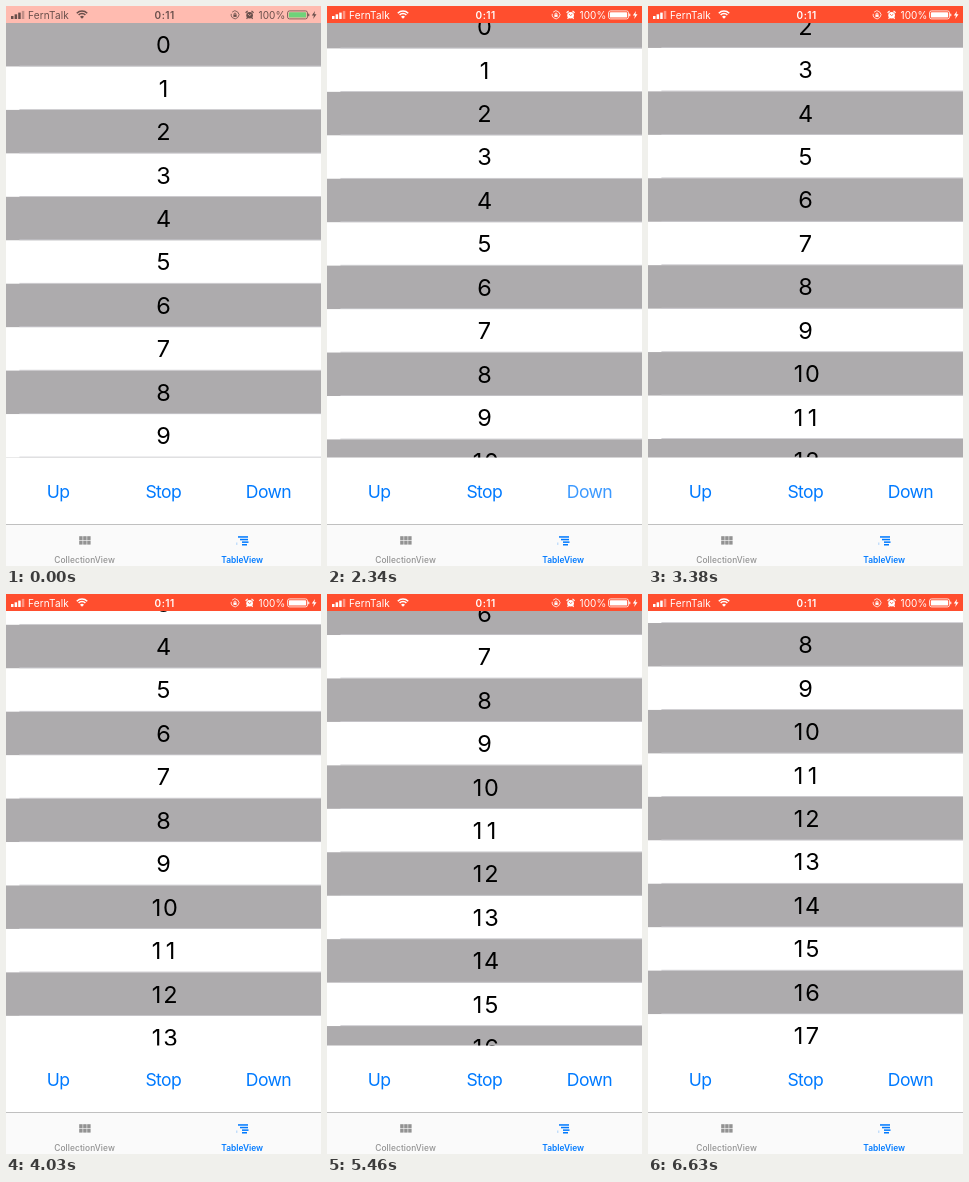
An HTML page with a canvas for the animation above (7.02 s loop, 315 by 560 pixels).

```html
<!DOCTYPE html>
<html lang="en">
<head>
<meta charset="utf-8">
<title>Auto-scrolling table</title>
<style>
  html, body { margin: 0; width: 100%; height: 100%; overflow: hidden; background: #fff; }
  canvas { display: block; width: 315px; height: 560px; }
</style>
</head>
<body>
<canvas id="stage"></canvas>
<script>
const W = 315, H = 560, LOOP = 7020, STEP = 130, LAST = 6630;
const LIST_TOP = 17, LIST_END = 451, ROW = 43.45;
const SPEED = 0.084, SCROLL_FROM = 2125, SCROLL_TO = 6120;
const BLUE = '#007aff', GRAY = '#929292';

const canvas = document.getElementById('stage');
const ctx = canvas.getContext('2d');
const dpr = window.devicePixelRatio || 1;
canvas.width = W * dpr;
canvas.height = H * dpr;

const clamp = (v, lo, hi) => Math.min(hi, Math.max(lo, v));
const mix = (a, b, k) => `rgb(${a.map((v, i) => Math.round(v + (b[i] - v) * k))})`;

function rect(x, y, w, h, color) {
  ctx.fillStyle = color;
  ctx.fillRect(x, y, w, h);
}

function text(str, x, y, size, color, { weight = 400, align = 'center', spacing = 0 } = {}) {
  ctx.font = `${weight} ${size}px Inter, "Liberation Sans", sans-serif`;
  ctx.letterSpacing = spacing + 'px';
  ctx.textAlign = align;
  ctx.fillStyle = color;
  ctx.fillText(str, x, y);
}

function arc(x, y, r, from = 0, to = Math.PI * 2) {
  ctx.beginPath();
  ctx.arc(x, y, r, from, to);
}

function poly(...pts) {
  ctx.beginPath();
  pts.forEach(([x, y]) => ctx.lineTo(x, y));
}

function box(x, y, w, h, r) {
  ctx.beginPath();
  ctx.roundRect(x, y, w, h, r);
}

function drawList(offset) {
  ctx.save();
  ctx.beginPath();
  ctx.rect(0, LIST_TOP, W, LIST_END + 0.5 - LIST_TOP);
  ctx.clip();
  const first = Math.floor(offset / ROW);
  for (let i = first; i < first + 11; i++) {
    const y = LIST_TOP + i * ROW - offset;
    if (i % 2 === 0) rect(0, y, W, ROW, '#adabad');
    rect(13.4, y + ROW - 0.8, W, 0.8, '#c8c7cc');
    const digits = [...String(i)];
    digits.forEach((d, n) => {
      const x = 157.5 + (n - (digits.length - 1) / 2) * 14;
      text(d, x, y + 30.2, 23.5, '#000');
    });
  }
  ctx.restore();
}

// Dims while held, then fades back after release.
function pressAlpha(t, down, up) {
  if (t < down) return 1;
  const k = clamp((t - up) / 450, 0, 1);
  return 0.2 + 0.8 * k * k * (3 - 2 * k);
}

function drawButtons(t) {
  const button = (label, x, alpha) => {
    ctx.globalAlpha = alpha;
    text(label, x, 491.7, 17.6, BLUE, { spacing: -0.6 });
    ctx.globalAlpha = 1;
  };
  button('Up', 52, 1);
  button('Stop', 157.3, pressAlpha(t, 5850, 6080));
  button('Down', 262.5, pressAlpha(t, 1560, 2050));
}

function drawTabs() {
  rect(0, 518, W, 42, '#fafafa');
  rect(0, 518, W, 0.8, '#b2b2b2');
  for (let i = 0; i < 6; i++) {
    rect(73.2 + (i % 3) * 4, 530.2 + Math.floor(i / 3) * 4.5, 3.4, 3.9, GRAY);
  }
  [[232, 10], [234, 8], [236, 6.5], [236, 5]].forEach(([x, w], i) => {
    rect(x, 530.2 + i * 2.6, w, 1.5, BLUE);
  });
  rect(230.3, 536.5, 1, 2.4, '#a8d0fa');
  text('CollectionView', 78.6, 556.8, 8.4, GRAY, { weight: 500, spacing: 0.08 });
  text('TableView', 236.2, 556.8, 8.4, BLUE, { weight: 600 });
}

function drawStatus(k) {
  const ink = mix([104, 78, 74], [255, 255, 255], k);
  rect(0, 0, W, LIST_TOP, mix([255, 187, 176], [255, 78, 46], k));

  for (let i = 0; i < 4; i++) {
    const h = 3 + i * 1.7;
    ctx.globalAlpha = i < 3 ? 1 : 0.4;
    rect(5 + i * 3.6, 13 - h, 2.5, h, ink);
  }
  ctx.globalAlpha = 1;
  text('FernTalk', 22, 12.6, 10, ink, { align: 'left', spacing: 0.15 });

  ctx.strokeStyle = ink;
  ctx.lineWidth = 1.5;
  for (const r of [7.4, 4.8]) {
    arc(76, 12.4, r, -Math.PI * 0.75, -Math.PI * 0.25);
    ctx.stroke();
  }
  ctx.fillStyle = ink;
  ctx.beginPath();
  ctx.moveTo(76, 12.8);
  ctx.arc(76, 12.8, 2.8, -Math.PI * 0.75, -Math.PI * 0.25);
  ctx.fill();

  text('0:11', 158.7, 12.6, 10, ink, { weight: 600, spacing: 0.5 });

  // Rotation lock
  ctx.lineWidth = 0.8;
  arc(229, 8.8, 3.9, -2.4, 3.4);
  ctx.stroke();
  rect(227.4, 8.4, 3.2, 2.5, ink);
  arc(229, 8.2, 1.1, Math.PI, 0);
  ctx.stroke();

  // Alarm
  ctx.fillStyle = ink;
  arc(243.6, 9.2, 3.3);
  ctx.fill();
  ctx.lineWidth = 1.2;
  for (const s of [-1, 1]) {
    poly([243.6 + s * 1.9, 4.9], [243.6 + s * 4, 6.7]);
    ctx.stroke();
    poly([243.6 + s * 2, 11.4], [243.6 + s * 3, 12.8]);
    ctx.stroke();
  }
  ctx.strokeStyle = mix([255, 187, 176], [255, 78, 46], k);
  ctx.lineWidth = 0.8;
  poly([241.8, 8], [243.6, 9.5], [245.3, 8.3]);
  ctx.stroke();

  text('100%', 266, 12.6, 10, ink, { spacing: 0.1 });

  // Battery
  ctx.strokeStyle = ink;
  ctx.lineWidth = 0.8;
  box(281.5, 4.9, 20, 8, 2);
  ctx.stroke();
  ctx.fillStyle = mix([110, 211, 121], [255, 255, 255], k);
  box(282.8, 6.2, 17.4, 5.4, 0.9);
  ctx.fill();
  ctx.fillStyle = ink;
  box(302.2, 7.5, 1.1, 2.8, 0.5);
  ctx.fill();
  poly([309, 5], [305.8, 9.4], [307.9, 9.4], [307.2, 13], [310.5, 8.3], [308.4, 8.3]);
  ctx.fill();
}

function draw(t) {
  ctx.setTransform(dpr, 0, 0, dpr, 0, 0);
  rect(0, 0, W, H, '#fff');
  drawList((clamp(t, SCROLL_FROM, SCROLL_TO) - SCROLL_FROM) * SPEED);
  drawButtons(t);
  drawTabs();
  drawStatus(clamp(t / 520, 0, 1));
}

const start = performance.now();
function tick() {
  const t = (performance.now() - start) % LOOP;
  draw(Math.min(LAST, Math.floor(t / STEP) * STEP));
  requestAnimationFrame(tick);
}
tick();
</script>
</body>
</html>
```
